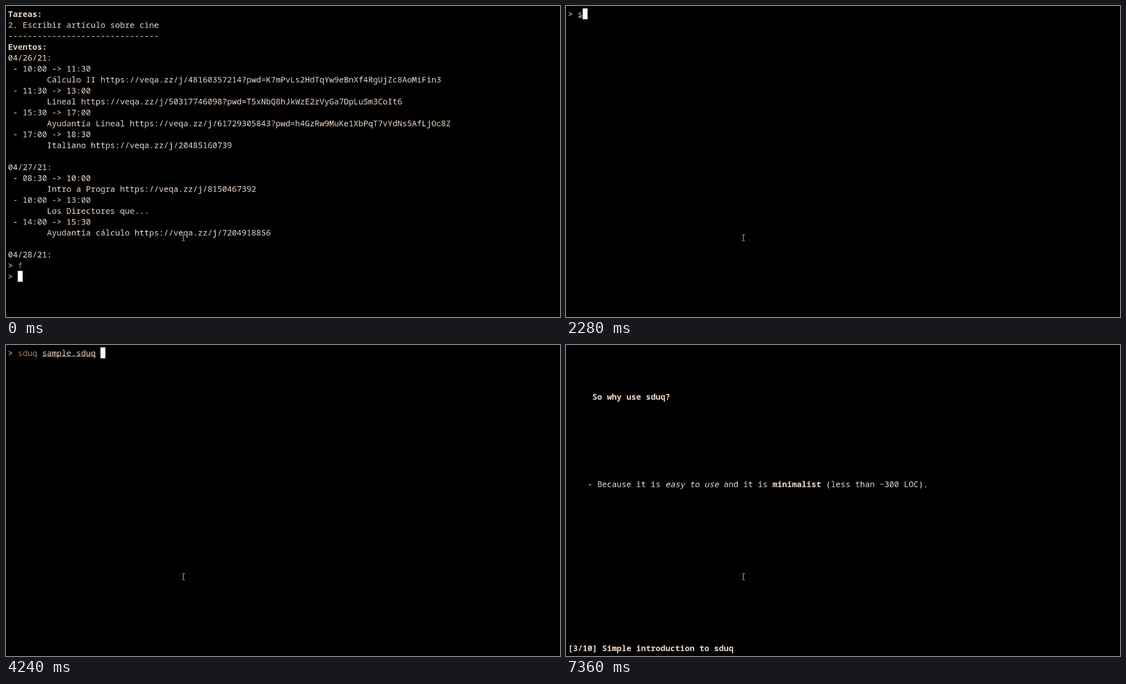
An HTML page with a canvas that plays this animation: 998x561 px, repeating every 8 s.

```html
<!DOCTYPE html>
<html lang="es">
<head>
<meta charset="utf-8">
<title>Terminal</title>
<style>
  html, body { margin: 0; width: 100%; height: 100%; overflow: hidden; background: #000; }
  canvas { display: block; width: 998px; height: 561px; }
</style>
</head>
<body>
<canvas id="screen" width="1366" height="768"></canvas>
<script>
// The terminal is drawn on its own pixel grid, then scaled down to the stage.
const COLUMNS = 113, CELL = 12, LINE = 27, ASCENT = 21, LEFT = 5, TOP = 6;
const LOOP = 8000;
const TEXT = '#efdccb', COMMAND = '#a68460';
const TITLE = 'Simple introduction to sduq';
const URL_BASE = 'https://veqa.zz/j/';

// Markup: b bold, i italic, u underlined, c command colour, k cursor block.
const CURSOR = '<k> </k>';

const entry = (hours, text) => ` - ${hours}\n        ${text}\n`;
const agenda = `<b>Tareas:</b>
<c><b>2</b></c>. Escribir artículo sobre cine
${'-'.repeat(31)}
<b>Eventos:</b>
04/26/21:
` +
  entry('10:00 -> 11:30', `Cálculo II ${URL_BASE}48160357214?pwd=K7mPvLs2HdTqYw9eBnXf4RgUjZc8AoMiFin3`) +
  entry('11:30 -> 13:00', `Lineal ${URL_BASE}50317746098?pwd=T5xNbQ8hJkWzE2rVyGa7DpLuSm3CoIt6`) +
  entry('15:30 -> 17:00', `Ayudantía Lineal ${URL_BASE}61729305843?pwd=h4GzRw9MuKe1XbPqT7vYdNs5AfLjOc8Z`) +
  entry('17:00 -> 18:30', `Italiano ${URL_BASE}20485160739`) +
  '\n04/27/21:\n' +
  entry('08:30 -> 10:00', `Intro a Progra ${URL_BASE}8150467392`) +
  entry('10:00 -> 13:00', 'Los Directores que...') +
  entry('14:00 -> 15:30', `Ayudantía cálculo ${URL_BASE}7204918856`) +
  `\n04/28/21:\n> <c>f</c>\n> ${CURSOR}`;

// Path-like words are underlined, a known command changes colour.
function prompt(typed, end = CURSOR) {
  const [command, ...rest] = typed.split(' ');
  const tag = command.length > 2 ? 'c' : 'u';
  const args = rest.map(word => ` <u>${word}</u>`).join('');
  return `> <${tag}>${command}</${tag}>${args}${end}`;
}

const center = (text, before = '', after = '') =>
  ' '.repeat((COLUMNS - text.length) / 2) + before + text + after;

function slide(page, rows) {
  const lines = Array(28).fill('');
  Object.assign(lines, rows);
  lines[27] = `<b>[${page}/10] ${TITLE}</b>`;
  return lines.join('\n');
}

const heading = '     <b>So why use sduq?</b>';

const steps = [
  [0, agenda],
  ...[
    [160, ''], [680, 's'], [1120, 'sa'], [1720, 's'], [1880, ''],
    [2280, 's'], [2560, 'sd'], [2720, 'sdu'], [2840, 'sduq'], [3000, 'sduq '],
    [3160, 'sduq s'], [3360, 'sduq sa'], [3480, 'sduq sam'], [3640, 'sduq samp'],
    [3800, 'sduq sampl'], [3920, 'sduq sample'], [4240, 'sduq sample.sduq ']
  ].map(([at, typed]) => [at, prompt(typed)]),
  [4520, prompt('sduq sample.sduq', '\n' + CURSOR)],
  [4600, slide(1, {
    11: center(TITLE, '<b>', '</b>'),
    12: center('Or how did I learn to stop worrying and learn to love text presentations...', '<i>', '</i>'),
    13: center('Nelo Pardiz'),
    14: center('April 24, 2021')
  })],
  [6640, slide(2, { 4: heading })],
  [7360, slide(3, {
    4: heading,
    12: '    - Because it is <i>easy to use</i> and it is <b>minimalist</b> (less than ~300 LOC).'
  })]
];

const canvas = document.getElementById('screen');
const ctx = canvas.getContext('2d');

function drawRun(text, x, y, styles) {
  const width = text.length * CELL;
  if (styles.has('k')) {
    ctx.fillStyle = '#fff';
    ctx.fillRect(x, y, width, LINE);
    return;
  }
  ctx.fillStyle = styles.has('c') ? COMMAND : TEXT;
  ctx.font = `${styles.has('b') ? 'bold ' : ''}20px "Noto Sans Mono", monospace`;
  ctx.save();
  ctx.translate(x, y + ASCENT);
  if (styles.has('u')) ctx.fillRect(0, 1, width, 1);
  if (styles.has('i')) ctx.transform(1, 0, -0.2, 1, 0, 0);
  ctx.fillText(text, 0, 0);
  ctx.restore();
}

function drawLine(line, row) {
  const styles = new Set();
  let x = LEFT;
  for (const token of line.split(/(<\/?\w>)/)) {
    const tag = token.match(/^<(\/?)(\w)>$/);
    if (tag) {
      tag[1] ? styles.delete(tag[2]) : styles.add(tag[2]);
    } else {
      drawRun(token, x, TOP + row * LINE, styles);
      x += token.length * CELL;
    }
  }
}

const beam = new Path2D('M434 564.5h2.5l1 1l1 -1h2.5M437.5 565v14M434 579.5h2.5l1 -1l1 1h2.5');
function drawPointer() {
  for (const [color, width] of [['#000', 3], ['#fff', 1]]) {
    ctx.strokeStyle = color;
    ctx.lineWidth = width;
    ctx.stroke(beam);
  }
}

let shown;
function render() {
  const time = performance.now() % LOOP;
  const content = steps.findLast(([at]) => at <= time)[1];
  if (content !== shown) {
    shown = content;
    ctx.fillStyle = '#000';
    ctx.fillRect(0, 0, canvas.width, canvas.height);
    content.split('\n').forEach(drawLine);
    drawPointer();
  }
  requestAnimationFrame(render);
}
render();
</script>
</body>
</html>
```
